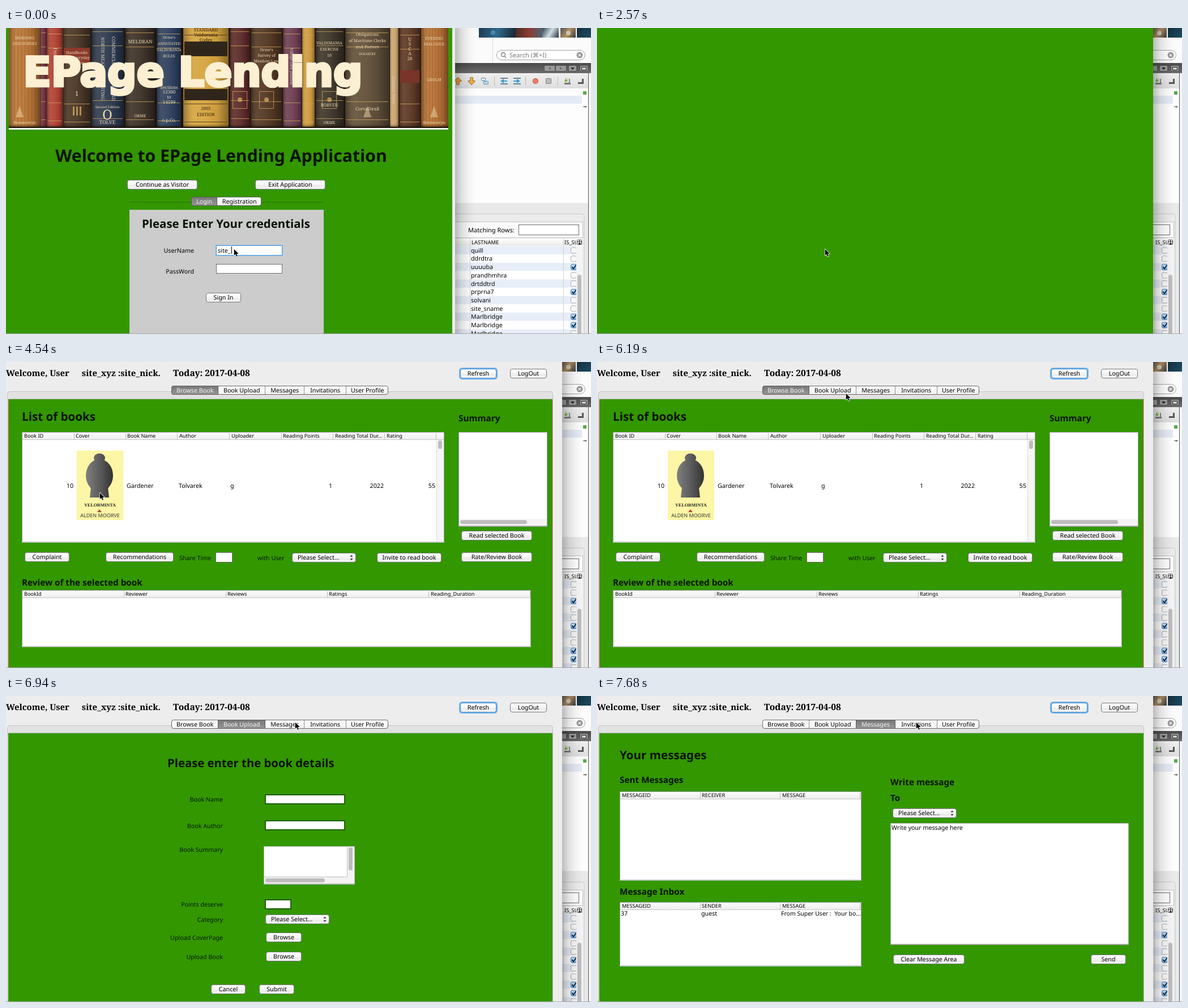
An HTML page with a canvas that plays this animation: 1033 px wide and 542 px high, repeating every 8000 ms.

```html
<!DOCTYPE html>
<html lang="en">
<head>
<meta charset="utf-8">
<title>Lending desk</title>
<style>
html, body { margin: 0; width: 100%; height: 100%; overflow: hidden; background: #fff; }
canvas { display: block; }
</style>
</head>
<body>
<canvas id="stage" width="1033" height="542"></canvas>
<script>
const ctx = document.getElementById('stage').getContext('2d');
const LOOP = 8000;
const GREEN = '#339700';
const SANS = '"Noto Sans", "Open Sans", sans-serif';
const SERIF = '"Noto Serif", serif';
const HEAVY = '"DejaVu Sans", sans-serif';
const CREAM = '#ecd9b0', GOLD = 'rgba(214,170,92,.75)';
ctx.textRendering = 'geometricPrecision';

// ---------- helpers ----------
function rect(x, y, w, h, color) {
  ctx.fillStyle = color;
  ctx.fillRect(x, y, w, h);
}

function grad(x0, y0, x1, y1, ...colors) {
  const g = ctx.createLinearGradient(x0, y0, x1, y1);
  colors.forEach((c, i) => g.addColorStop(i / (colors.length - 1), c));
  return g;
}

function round(x, y, w, h, r, fill, stroke, width = 1) {
  ctx.beginPath();
  ctx.roundRect(x, y, w, h, r);
  if (fill) { ctx.fillStyle = fill; ctx.fill(); }
  if (stroke) { ctx.strokeStyle = stroke; ctx.lineWidth = width; ctx.stroke(); }
}

function poly(points, fill, stroke) {
  ctx.beginPath();
  points.forEach(([x, y]) => ctx.lineTo(x, y));
  ctx.closePath();
  if (stroke) { ctx.strokeStyle = stroke; ctx.lineWidth = 1.6; ctx.lineJoin = 'round'; ctx.stroke(); }
  ctx.fillStyle = fill;
  ctx.fill();
}

function circle(x, y, r, fill) {
  ctx.beginPath();
  ctx.arc(x, y, r, 0, Math.PI * 2);
  ctx.fillStyle = fill;
  ctx.fill();
}

// cy is the middle of the capital letters
function text(s, x, cy, o = {}) {
  const { size = 10.7, weight = 400, color = '#000', align = 'left', family = SANS } = o;
  ctx.font = `${weight} ${size}px ${family}`;
  ctx.textAlign = align;
  ctx.fillStyle = color;
  ctx.fillText(s, x, cy + size * 0.36);
  return ctx.measureText(s).width;
}

const heading = (s, x, cy, size = 15.3, align = 'left') =>
  text(s, x, cy, { size, weight: 700, color: '#071300', align });
const label = (s, x, cy, align = 'right') => text(s, x, cy, { align, color: '#061800' });

// ---------- widgets ----------
function button(s, x, y, w, h = 16, focus = false) {
  if (focus) round(x - 0.5, y - 0.5, w + 1, h + 1, 4, null, '#6db2ee', 3);
  round(x + 0.5, y + 0.5, w - 1, h - 1, 3.5,
    grad(0, y, 0, y + h, '#ffffff', '#fafafa', '#ececec', '#f8f8f8'), focus ? '#4f8fc6' : '#777');
  text(s, x + w / 2, y + h / 2, { align: 'center' });
}

function select(x, y) {
  button('', x, y, 113, 17);
  text('Please Select...', x + 10, y + 8.2);
  const a = x + 105, m = y + 8.5;
  poly([[a - 2.5, m - 1.5], [a, m - 5], [a + 2.5, m - 1.5]], '#444');
  poly([[a - 2.5, m + 1.5], [a, m + 5], [a + 2.5, m + 1.5]], '#444');
}

function field(x, y, w, h, focus = false) {
  if (focus) round(x - 1, y - 1, w + 2, h + 2, 2, '#7fbcf2');
  rect(x, y, w, h, focus ? '#5a9cd8' : '#6f6f6f');
  rect(x + 1, y + 1, w - 2, h - 2, '#fff');
}

function tabs(x, y, edges, names, active) {
  const w = edges[edges.length - 1] - x;
  round(x + 0.5, y + 0.5, w - 1, 15, 3.5, grad(0, y, 0, y + 16, '#fff', '#f1f1f1'), '#666');
  names.forEach((name, i) => {
    const l = i ? edges[i - 1] : x, r = edges[i], last = i === names.length - 1;
    if (i === active) {
      const a = i ? 0 : 3.5, b = last ? 3.5 : 0;
      round(l + 0.5, y + 0.5, r - l, 15, [a, b, b, a], grad(0, y, 0, y + 16, '#777', '#979797'), '#5c5c5c');
    } else if (!last) {
      rect(r, y + 1, 1, 14, '#8d8d8d');
    }
    text(name, (l + r) / 2 + 0.7, y + 8, { align: 'center', color: i === active ? '#f4f4f4' : '#000' });
  });
}

// cols: [separator x after the column, title, title x]
function table(x, y, w, h, cols) {
  rect(x, y, w, h, '#9b9b9b');
  rect(x + 1, y + 1, w - 2, h - 3, '#fff');
  rect(x + 1, y + 1, w - 2, 12, grad(0, y, 0, y + 13, '#fff', '#ededed'));
  rect(x + 1, y + 13, w - 2, 1, '#c4c4c4');
  rect(x, y + h - 2, w, 2, '#c9c9c9');
  for (const [sep, name, tx] of cols) {
    rect(sep, y + 2, 1, 11, '#bcbcbc');
    text(name, tx, y + 7, { size: 9.2 });
  }
}

const thumb = (x, y, w, h) => round(x, y, w, h, Math.min(w, h) / 2, '#bdbdbd');

// ---------- window behind ----------
function thumbs() {
  rect(835, 0, 65, 17, grad(835, 0, 900, 17, '#1d3a50', '#2f6a8c', '#16222c'));
  rect(900, 0, 47, 17, grad(900, 0, 947, 0, '#4a2a26', '#8c3b33', '#4f6470'));
  rect(947, 0, 29, 17, grad(947, 0, 976, 17, '#2c4350', '#d0dce2', '#26333c'));
  rect(979, 0, 27, 17, grad(979, 0, 1006, 17, '#4f5358', '#b39060', '#35393f'));
  rect(1008, 0, 25, 17, grad(1008, 0, 1033, 17, '#12303f', '#1e4a60'));
  circle(860, 8, 4, '#4d8aa8');
  circle(993, 9, 4, '#cfc5b0');
}

function toolbar() {
  rect(793, 80, 235, 27, grad(0, 80, 0, 107, '#efefef', '#dedede'));
  poly([[792, 94], [798, 88], [804, 94], [800, 94], [800, 100], [796, 100], [796, 94]], '#f0a030', '#8a5a20');
  poly([[816, 94], [820, 94], [820, 88], [824, 88], [824, 94], [828, 94], [822, 100]], '#f0b040', '#8a5a20');
  round(839.5, 88.5, 7, 5, 1, '#dcebf7', '#4b82ac');
  round(843.5, 94.5, 8, 5, 1, '#bcd9ee', '#4b82ac');
  for (const [x, d] of [[879, -1], [902, 1]]) {
    rect(x - 6, 88, 13, 2, '#63839a');
    rect(x - 6, 98, 13, 2, '#63839a');
    poly([[x + d * 6, 94], [x, 90], [x, 93], [x - d * 6, 93], [x - d * 6, 95], [x, 95], [x, 98]], '#3b9fd0');
  }
  for (const x of [862, 917, 974]) rect(x, 86, 1, 16, '#b9b9b9');
  circle(935, 94, 5, '#b94b38');
  circle(935, 94, 4, '#ee7c66');
  round(953.5, 89.5, 9, 9, 1, '#bcbcbc', '#777');
  rect(986, 97, 11, 3, '#777');
  rect(994, 90, 2, 8, '#888');
  poly([[986, 95], [989, 88], [990, 94], [993, 88], [991, 95]], '#69ac38');
  rect(1010, 96, 10, 3, '#555');
  rect(1017, 90, 3, 8, '#555');
}

const people = ['quill', 'ddrdtra', 'uuuuba', 'prandhmhra', 'drtddtrd', 'prprna7', 'solvani',
  'site_sname', 'Marlbridge', 'Marlbridge', 'Marlbridge'];
const ticked = [2, 5, 8, 9];

function checkbox(x, y, on) {
  round(x + 0.5, y + 0.5, 10, 10, 2.5, on ? grad(0, y, 0, y + 11, '#c9e4fa', '#6cb0ea') : '#f8f8f8',
    on ? '#4c77a6' : '#aaa');
  if (!on) return;
  ctx.beginPath();
  ctx.moveTo(x + 2.5, y + 5);
  ctx.lineTo(x + 5, y + 8.5);
  ctx.lineTo(x + 9.5, y + 2);
  ctx.strokeStyle = '#0c1d33';
  ctx.lineWidth = 1.8;
  ctx.stroke();
}

function desktop() {
  rect(0, 0, 1033, 542, '#fbfbfb');
  thumbs();
  rect(859, 18, 1, 44, '#dadada');
  round(866.5, 39.5, 156, 17, 8.5, '#fff', '#a2a2a2');
  ctx.beginPath();
  ctx.arc(878, 47, 3.5, 0, 7);
  ctx.moveTo(881, 50);
  ctx.lineTo(883, 53);
  ctx.strokeStyle = '#777';
  ctx.lineWidth = 1.3;
  ctx.stroke();
  text('Search (⌘+I)', 889, 48, { color: '#777', size: 11, family: '"Noto Sans", "DejaVu Sans", sans-serif' });
  circle(1013, 48, 5.5, '#999');
  text('×', 1013, 47.6, { color: '#fff', align: 'center', weight: 700, size: 11 });

  rect(793, 62, 240, 18, grad(0, 62, 0, 80, '#4a4a4a', '#6b6b6b'));
  for (const [x, w] of [[950, 20], [970, 20], [993, 15], [1013, 15]])
    round(x + 0.5, 66.5, w - 1, 10, 1.5, '#999', '#555');
  poly([[962, 69], [958, 71.5], [962, 74]], '#666');
  poly([[978, 69], [982, 71.5], [978, 74]], '#666');
  poly([[997, 70], [1004, 70], [1000.5, 74]], '#222');
  round(1016.5, 69.5, 8, 5, 0, '#ccc', '#222');
  toolbar();

  rect(793, 107, 235, 203, '#fdfdfd');
  rect(793, 120, 224, 14, '#e4eaf5');
  rect(1019, 112, 6, 6, '#58a94e');
  rect(1019, 139, 7, 1, '#555');
  rect(1022, 138, 2, 3, '#777');

  rect(793, 310, 235, 232, '#e9e9e9');
  round(700, 329.5, 321, 230, 4, '#ececec', '#c8c8c8');
  rect(793, 343, 226, 29, '#c4c4c4');
  rect(793, 344, 225, 27, '#fafafa');
  text('Matching Rows:', 816, 358, { size: 11 });
  field(905, 348, 107, 19);

  rect(793, 373, 224, 169, '#fff');
  rect(793, 373, 214, 13, grad(0, 373, 0, 386, '#fff', '#eaeaea'));
  text('LASTNAME', 822, 380, { size: 9.4 });
  ctx.save();
  ctx.beginPath();
  ctx.rect(793, 373, 214, 169);
  ctx.clip();
  text('IS_SUPER', 986, 380, { size: 9.4 });
  people.forEach((name, i) => {
    const y = 386.5 + i * 14.7;
    rect(793, y, 214, 14.7, i % 2 ? '#fff' : '#e8eef8');
    text(name, 821, y + 7.4);
    checkbox(997, y + 2, ticked.includes(i));
  });
  ctx.restore();
  for (const x of [819, 984]) rect(x, 373, 1, 169, '#d0d0d0');
  round(1008.5, 375.5, 8, 8, 1, '#fff', '#333');
  rect(1009, 378, 8, 1, '#333');
  rect(1012, 376, 1, 5, '#333');
  poly([[1010, 381], [1016, 381], [1013, 384]], '#222');
  rect(1007, 386, 11, 156, '#f4f4f4');
  thumb(1009, 437, 7, 112);
  rect(1028, 80, 1, 462, '#555');
  rect(1029, 80, 4, 462, '#f6f6f6');
}

function windowShadow(x) {
  rect(x, 0, 36, 542, grad(x, 0, x + 36, 0, 'rgba(0,0,0,.26)', 'rgba(0,0,0,.11)', 'rgba(0,0,0,.04)', 'rgba(0,0,0,0)'));
}

// ---------- bookshelf ----------
const spines = [
  [5, 55, '#b97638'], [60, 12, '#6b3040'], [72, 28, '#b04134'], [100, 50, '#463426'], [151, 57, '#2b3850'],
  [210, 53, '#3a3028'], [266, 43, '#2c3f60'], [313, 80, '#d5a440'], [395, 36, '#5a2a2a'], [432, 56, '#503524'],
  [489, 33, '#6c3d54'], [523, 22, '#cf9c42'], [546, 51, '#3b342a'], [599, 78, '#5f4e3a'], [678, 15, '#caa672'],
  [694, 38, '#5b3626'], [733, 48, '#b67236']
];
// lines, x, first y, size, line step
const spineText = [
  [['MORNING', 'DISCOURSES'], 33, 17, 7, 10], [['Brennowyn'], 33, 167, 7, 0],
  [['Handbooks', 'and Everyday', 'Practice'], 125, 43, 7, 9], [['1'], 125, 116, 11, 0],
  [['Second Edition'], 179, 140, 6, 0], [['O'], 179, 153, 24, 0], [['TOLVE'], 179, 167, 9, 0],
  [['MELDRAN'], 237, 24, 8.5, 0], [['ORME'], 237, 155, 7, 0],
  [["Orme's", 'ANNOTATED', 'VALDORANIA', 'RULES'], 288, 17, 6.6, 11],
  [['Sections', '12300', 'to', '14599'], 288, 105, 8, 8.6], [['o.p.Co.'], 288, 163, 8, 0],
  [['STANDARD', 'Valdorania', 'Codes'], 353, 3, 8, 9], [['2005'], 353, 142, 7.5, 0], [['EDITION'], 353, 153, 7.5, 0],
  [["Orme's", 'Survey of', 'Meadow Law'], 460, 38, 7, 10],
  [['VALDORANIA', 'EXERCISE', '10'], 571, 26, 7, 11], [['BORVEN'], 571, 136, 7.5, 0], [['ORME'], 571, 167, 7, 0],
  [['Obligations', 'of Maritime Clerks', 'and Porters'], 638, 11, 7.4, 11], [['DOLMERY'], 638, 46, 6, 0],
  [['CorvaDexil'], 638, 143, 8, 0],
  [['U', 'S', 'C', 'A', '28'], 713, 20, 8, 8.5],
  [['EVENING', 'DIALOGUE'], 756, 18, 7, 10], [['GROLM'], 756, 91, 7, 0], [['Brennowyn'], 756, 167, 7, 0]
];

function sideText(s, x, y, size) {
  ctx.save();
  ctx.translate(x, y);
  ctx.rotate(Math.PI / 2);
  text(s, 0, 0, { size, color: '#d6cdbd', align: 'center', family: SERIF });
  ctx.restore();
}

function shelf() {
  ctx.save();
  ctx.beginPath();
  ctx.rect(5, 0, 776, 177);
  ctx.clip();
  rect(5, 0, 776, 177, '#1d120c');
  spines.forEach(([x, w, color], i) => {
    rect(x, 0, w, 175, color);
    rect(x, 0, w, 175, grad(x, 0, x + w, 0, 'rgba(0,0,0,.3)', 'rgba(255,235,190,.1)',
      'rgba(255,235,190,.06)', 'rgba(0,0,0,.06)', 'rgba(0,0,0,.36)'));
    if (i === 0 || i === 16) {
      for (let k = 0; k < 9; k++) rect(x + 3 + k * w / 9, 0, 2, 175, 'rgba(90,35,5,.14)');
    } else {
      for (const y of [6, 31, 128, 160]) rect(x + 2, y + i % 4 * 2, w - 4, 1, i === 7 ? '#5e421a' : GOLD);
    }
  });
  // title patches and bands
  rect(102, 35, 46, 28, '#8b3a2d');
  rect(315, 24, 76, 26, '#30251a');
  rect(315, 108, 76, 20, '#30251a');
  rect(696, 75, 34, 22, '#7a3428');
  for (const x of [413, 571, 460]) {
    ctx.strokeStyle = GOLD;
    ctx.lineWidth = 1;
    ctx.strokeRect(x - 12.5, 112.5, 25, 30);
    circle(x, 127, 4, GOLD);
  }
  for (const x of [24, 756, 638]) poly([[x - 7, 158], [x, 138], [x + 7, 158]], 'rgba(240,215,165,.5)');
  for (let k = 0; k < 3; k++) rect(118 + k * 6, 139, 3, 16, GOLD);
  sideText('COMMERCIAL GARDENS AND', 190, 72, 8);
  sideText('NORTH MEADOW PLANTING', 171, 72, 8);
  sideText('Village Law Journal', 505, 68, 7);
  sideText('Fern Custom', 87, 62, 9);
  sideText('Harbour Notes', 685, 110, 7);
  for (const [lines, x, y, size, step] of spineText)
    lines.forEach((s, i) => text(s, x, y + i * step,
      { size, align: 'center', family: SERIF, color: x === 353 ? '#2b1c0c' : CREAM }));
  rect(5, 170, 776, 7, grad(0, 170, 0, 177, 'rgba(20,10,5,0)', 'rgba(20,10,5,.55)'));
  ctx.restore();
  rect(5, 177, 776, 3, '#f7f7f2');

  ctx.font = `700 72px ${HEAVY}`;
  ctx.textAlign = 'center';
  ctx.lineJoin = 'miter';
  ctx.strokeStyle = ctx.fillStyle = '#fdf0d2';
  ctx.lineWidth = 4.6;
  ctx.strokeText('EPage Lending', 330, 102.5);
  ctx.fillText('EPage Lending', 330, 102.5);
}

// ---------- pages ----------
function login(t) {
  rect(0, 0, 788, 542, GREEN);
  rect(788, 0, 5, 542, '#ededed');
  shelf();
  heading('Welcome to EPage Lending Application', 380, 226, 30.2, 'center');
  button('Continue as Visitor', 214, 269, 124, 17);
  button('Exit Application', 440, 269, 124, 17);
  rect(218, 308, 343, 1, '#286f05');
  tabs(327, 299, [372, 451], ['Login', 'Registration'], 0);
  rect(218, 322, 343, 220, '#ccc');
  heading('Please Enter Your credentials', 388.5, 347, 20.4, 'center');
  text('UserName', 332, 394, { align: 'right' });
  text('PassWord', 332, 431, { align: 'right' });

  const typed = 5 + [450, 630, 930].filter(k => t >= k).length;
  const dots = [1530, 1680, 1980].filter(k => t >= k).length;
  const inPass = t >= 1080;
  field(371, 385, 117, 18, !inPass);
  field(371, 418, 117, 17, inPass);
  const w = text('site_xyz'.slice(0, typed), 374, 394);
  for (let i = 0; i < dots; i++) circle(377 + i * 7, 427, 2.5, '#000');
  if (inPass) rect(374 + dots * 6.7, 420, 1, 13, '#000');
  else rect(374 + Math.round(w) + 1, 387, 1, 13, '#000');
  button('Sign In', 353, 469, 62, 17);
}

function frame(active) {
  rect(0, 0, 982, 542, '#ededed');
  const serif = { size: 14.9, weight: 700, family: SERIF };
  text('Welcome, User', 0, 19.5, serif);
  text('site_xyz :site_nick.', 273, 19.5, { ...serif, align: 'right' });
  text('Today: 2017-04-08', 295, 19.5, { ...serif, size: 15.6 });
  button('Refresh', 802, 12, 64, 17, true);
  button('LogOut', 890, 12, 65, 17);
  round(2.5, 52.5, 963, 500, 4, '#e2e2e2', '#c3c3c3');
  rect(4, 66, 961, 476, GREEN);
  rect(4, 65, 961, 1, '#b8b8b8');
  tabs(292, 42, [374, 457, 526, 600, 675],
    ['Browse Book', 'Book Upload', 'Messages', 'Invitations', 'User Profile'], active);
}

function cover() {
  rect(125, 157, 82, 123, '#fcf6a6');
  const tone = grad(143, 0, 190, 0, '#7d7d7d', '#5a5a5a', '#303030');
  ctx.fillStyle = tone;
  ctx.beginPath();
  ctx.ellipse(165, 201, 24, 29, 0, 0, 7);
  ctx.ellipse(165, 170, 10, 8, 0, 0, 7);
  ctx.fill();
  poly([[150, 222], [180, 222], [182, 240], [148, 240]], tone);
  text('VELORMINTA', 166, 253, { size: 8, weight: 700, family: '"Liberation Serif", serif', align: 'center', color: '#222' });
  poly([[161, 266], [165, 261], [169, 266]], '#c4402c');
  text('ALDEN MOORVE', 166, 272, { size: 9, align: 'center', color: '#333' });
}

function browse() {
  frame(0);
  rect(4, 66, 1, 476, '#b0521d');
  rect(964, 66, 1, 476, '#a0561d');
  heading('List of books', 28, 96.5, 20.6);
  heading('Summary', 799, 99);
  table(28, 124, 746, 196, [[120, 'Book ID', 32], [211, 'Cover', 123], [302, 'Book Name', 214],
    [394, 'Author', 306], [486, 'Uploader', 398], [577, 'Reading Points', 489],
    [668, 'Reading Total Dur...', 581], [759, 'Rating', 672]]);
  rect(760, 138, 13, 180, '#f5f5f5');
  rect(760, 138, 1, 180, '#dcdcdc');
  thumb(763, 139, 7, 15);
  cover();
  for (const [s, x, align] of [['10', 119, 'right'], ['Gardener', 213], ['Tolvarek', 305], ['g', 396],
    ['1', 576, 'right'], ['2022', 667, 'right'], ['55', 758, 'right']]) text(s, x, 219.5, { align });

  rect(799, 124, 157, 168, '#a0a0a0');
  rect(800, 125, 155, 165, '#fff');
  rect(800, 278, 155, 12, '#f4f4f4');
  thumb(802, 280, 118, 7);
  button('Read selected Book', 804, 299, 125, 17);
  button('Complaint', 33, 337, 79, 17);
  button('Recommendations', 176, 337, 120, 17);
  label('Share Time', 306, 347, 'left');
  field(370, 337, 30, 18);
  label('with User', 444, 347, 'left');
  select(505, 338);
  button('Invite to read book', 655, 338, 114, 17);
  button('Rate/Review Book', 804, 337, 125, 17);
  heading('Review of the selected book', 28, 390);
  table(28, 404, 899, 101, [[208, 'BookId', 32], [388, 'Reviewer', 211], [567, 'Reviews', 391],
    [746, 'Ratings', 570], [925, 'Reading_Duration', 750]]);
}

function upload() {
  frame(1);
  heading('Please enter the book details', 285, 119, 20.3);
  for (const [s, y] of [['Book Name', 183.5], ['Book Author', 230], ['Book Summary', 272.5], ['Points deserve', 369.5],
    ['Category', 396.5], ['Upload CoverPage', 428], ['Upload Book', 462]]) label(s, 383, y);
  for (const [y, w] of [[174, 142], [220, 142], [360, 47]]) {
    rect(457, y, w, 18, '#1d6000');
    rect(459, y + 2, w - 4, 14, '#fff');
  }
  rect(455, 266, 161, 68, '#bbb');
  rect(456, 267, 146, 53, '#fff');
  rect(603, 267, 12, 65, '#f3f3f3');
  rect(456, 321, 159, 11, '#f3f3f3');
  thumb(605, 268, 7, 41);
  thumb(458, 323, 105, 7);
  select(458, 387);
  button('Browse', 459, 419, 63, 17);
  button('Browse', 459, 453, 63, 17);
  button('Cancel', 362, 511, 61, 17);
  button('Submit', 447, 511, 62, 17);
}

function messages() {
  frame(2);
  heading('Your messages', 40, 105, 20.6);
  heading('Sent Messages', 40, 148.5);
  heading('Message Inbox', 40, 346);
  heading('Write message', 518, 152);
  heading('To', 518, 180);
  const cols = who => [[182, 'MESSAGEID', 44], [323, who, 185], [464, 'MESSAGE', 327]];
  table(40, 169, 427, 158, cols('RECEIVER'));
  table(40, 365, 427, 114, cols('SENDER'));
  text('37', 42, 385.5);
  text('guest', 184, 385.5);
  text('From Super User :  Your bo...', 325, 385.5, { size: 10.5 });
  select(522, 199);
  rect(518, 225, 421, 216, '#aaa');
  rect(519, 226, 419, 213, '#fff');
  text('Write your message here', 520, 233.5);
  button('Clear Message Area', 523, 458, 126, 17);
  button('Send', 872, 458, 62, 17);
}

// ---------- pointer ----------
const path = [
  [0, 402, 391], [3200, 420, 312], [3340, 420, 242], [3640, 352, 237], [3790, 302, 231],
  [4090, 258, 226], [4240, 208, 225], [4390, 178, 229], [4540, 165, 231],
  [5440, 222, 190], [5590, 322, 125], [5740, 408, 74], [5890, 439, 55],
  [6790, 480, 50], [6940, 510, 46], [7540, 540, 46], [7680, 563, 46]
];

function pointer(t) {
  const [, x, y] = path.findLast(p => t >= p[0]);
  const shape = [[0, 0], [0, 11], [2.6, 8.8], [4.4, 13], [6.2, 12.2], [4.5, 8.2], [8, 8]];
  poly(shape.map(([a, b]) => [x + 0.7 + a, y + 0.8 + b]), '#000', '#fff');
}

function draw(t) {
  desktop();
  windowShadow(t < 2570 ? 793 : 982);
  if (t < 2570) login(t);
  else if (t < 2870) rect(0, 0, 982, 542, GREEN);
  else if (t < 6490) browse();
  else if (t < 7390) upload();
  else messages();
  pointer(t);
  rect(0, 541, 1033, 1, '#a6a6a6');
}

const start = performance.now();
function tick() {
  draw((performance.now() - start) % LOOP);
  requestAnimationFrame(tick);
}
tick();
</script>
</body>
</html>
```
